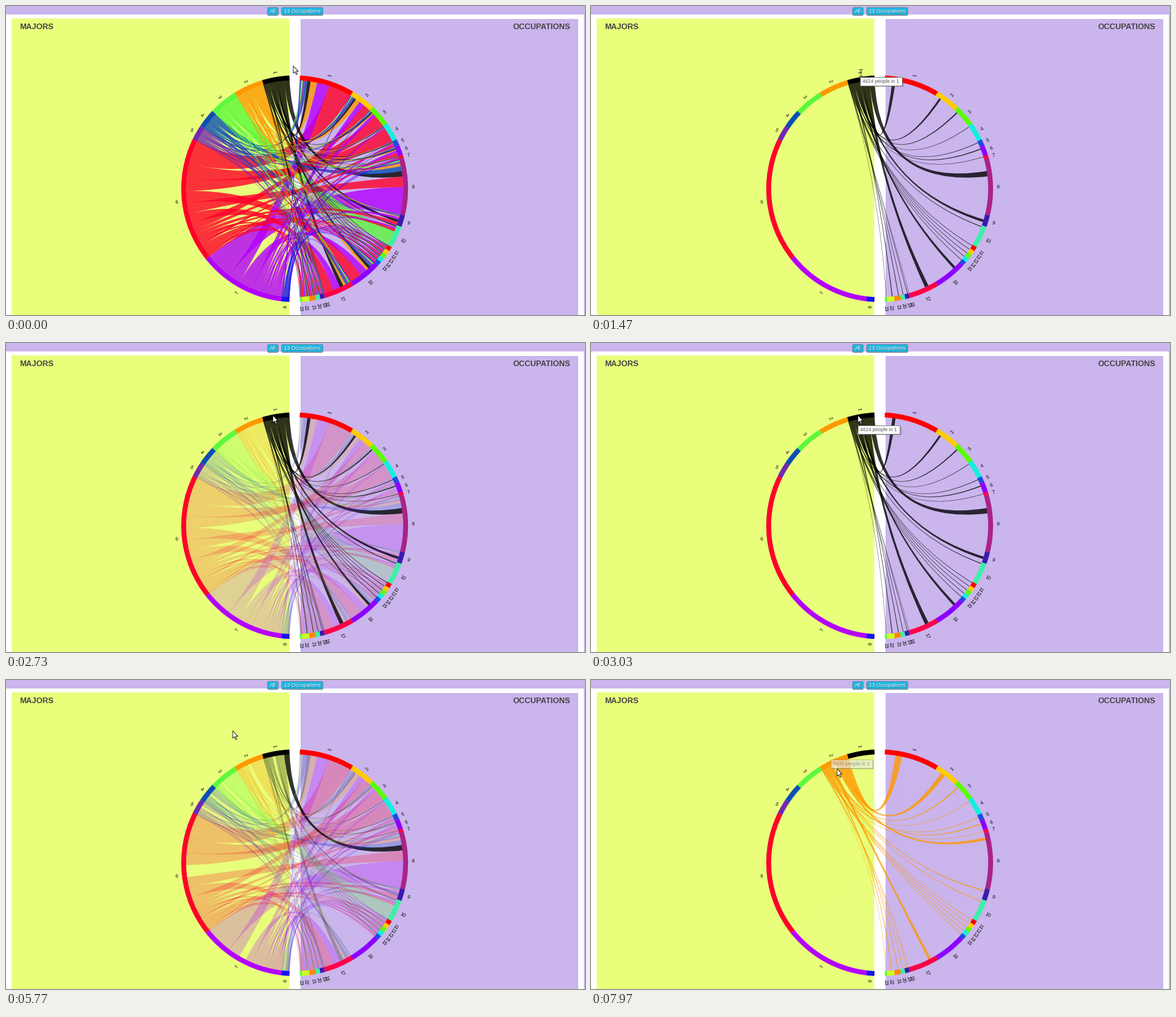
Recreate the animation shown at these times as a matplotlib script. Size 1024 px wide and 547 px high, loop 8000 ms.

```python
import numpy as np
import matplotlib.pyplot as plt
from matplotlib.animation import FuncAnimation
from matplotlib.collections import PathCollection
from matplotlib.colors import to_rgb
from matplotlib.patches import FancyBboxPatch, Polygon, Rectangle, Wedge
from matplotlib.path import Path

W, H, DPI = 1024, 547, 64
LOOP, STEP = 8000, 40
PT = 72 / DPI                      # points per pixel
CX, CY, R_OUT, R_IN = 510.5, 323.5, 200.5, 192
GAP = 2.7                          # half opening at top and bottom, degrees
LILAC, LEMON = "#cab5ec", "#e9ff7c"
plt.rcParams["font.family"] = "Liberation Sans"

# Share of each group in degrees, running down from the top
MAJORS = np.array([14, 15.3, 14.6, 9.6, 7.8, 64.4, 44.8, 4.1])
JOBS = np.array([28.3, 12.8, 10.9, 9.4, 3.1, 5.3, 1.7, 29.5, 6, 11.4,
                 *[2.34] * 5, 16.1, 15.3, .4, 2.3, 2.3, 3.2, 3.9, 1])
MAJOR_COL = ["#000000", "#ff9900", "#5cf83c", "#0b4fb5", "#7228b0",
             "#ff0029", "#b300ff", "#1a10f0"]
JOB_COL = ["#ff0000", "#ffcc00", "#59ff00", "#0ff0e0", "#1f4ce0", "#8c00ff",
           "#ff0048", "#aa2288", "#3a1ab0", "#3cf0a8"] * 2
JOB_COL += ["#ff8800", "#ccff22", "#59ff44"]

# Pairs (major, job) that are far more common than chance
AFFINITY = {(3, 10): 40, (6, 4): 9, (7, 8): 3.7, (1, 9): 3, (4, 8): 2.8,
            (6, 3): 2.8, (2, 2): 2.2, (1, 8): 2.1, (2, 1): 1.9, (6, 1): 1.8,
            (1, 17): 1.6, (7, 1): 1.3, (6, 16): 1.2}


def flow_matrix():
    """Spread evenly, favour the linked pairs, then fit both totals."""
    m = np.outer(MAJORS, JOBS)
    for (major, job), k in AFFINITY.items():
        m[major - 1, job - 1] *= k
    for _ in range(80):
        m *= (MAJORS / m.sum(axis=1))[:, None]
        m *= JOBS / m.sum(axis=0)
    return m


def bounds(spans, side):
    """Clockwise angles from the top; side is -1 for the left half."""
    return side * (GAP + np.concatenate([[0], np.cumsum(spans)]))


def polar(deg, r=R_IN):
    a = np.radians(deg)
    return np.column_stack([CX + r * np.sin(a), CY - r * np.cos(a)])


def sub_arcs(sizes, start):
    """Stack the sizes clockwise from start, smallest first."""
    order = np.argsort(sizes)
    ends = start + np.cumsum(sizes[order])
    out = np.empty((len(sizes), 2))
    out[order] = np.column_stack([ends - sizes[order], ends])
    return out


def chord_path(src, dst):
    n = 12
    a, b = polar(np.linspace(*src, n)), polar(np.linspace(*dst, n))
    hub = [[CX, CY]]
    arc = [Path.LINETO] * (n - 1)
    curve = [Path.CURVE3] * 2
    return Path(np.vstack([a, hub, b, hub, a[:1]]),
                [Path.MOVETO] + arc + curve + arc + curve)


def ease(x):
    x = min(max(x, 0), 1)
    return 4 * x ** 3 if x < .5 else 1 - 4 * (1 - x) ** 3


def fade(t, start, end, step, lag=0):
    """Stepped 750 ms cubic transition that is complete at end."""
    if t < start:
        return 0
    if t >= end:
        return 1
    return ease(((t - start) // step * step - lag) / 750)


fig = plt.figure(figsize=(W / DPI, H / DPI), dpi=DPI, facecolor="white")
ax = fig.add_axes([0, 0, 1, 1])
ax.set_xlim(0, W)
ax.set_ylim(H, 0)
ax.axis("off")


def rect(x0, y0, x1, y1, **kw):
    kw = {"lw": 0, **kw}
    return ax.add_patch(Rectangle((x0, y0), x1 - x0, y1 - y0, **kw))


def text(x, y, s, px, **kw):
    return ax.text(x, y, s, fontsize=px * PT, **kw)


def button(x0, x1, label):
    for dy, fc, ec in ((.8, "#8d8a99", "#8d8a99"), (0, "#1fb6e2", "#6f8792")):
        ax.add_patch(FancyBboxPatch(
            (x0 + 2, 4 + dy), x1 - x0 - 4, 10.5, lw=PT, fc=fc, ec=ec,
            boxstyle="round,pad=1.5,rounding_size=2.5", zorder=2))
    for d, c in ((.7, "#0c6c94"), (0, "white")):
        text((x0 + x1) / 2 + d, 12 + d, label, 9.3, color=c, ha="center",
             zorder=3)


def ring(edges, colors):
    for k, color in enumerate(colors):
        lo, hi = sorted(edges[k:k + 2])
        ax.add_patch(Wedge((CX, CY), R_OUT, lo - 90, hi - 90,
                           width=R_OUT - R_IN, fc=color, ec=color,
                           lw=.2, zorder=3))
        mid = (lo + hi) / 2
        left = mid < 0
        text(*polar(mid, 207.4)[0], str(k + 1), 8.8, color="#111111",
             rotation=(-90 if left else 90) - mid, rotation_mode="anchor",
             ha="right" if left else "left", va="center_baseline", zorder=4)


rect(0, 0, W, 14.6, color=LILAC)
rect(1021.5, 0, W, H, color=LILAC)
rect(10, 21.5, 500.5, H, color=LEMON)
rect(521, 22.5, 1011.5, H, color=LILAC)
text(24, 41, "MAJORS", 14, weight="bold", color="#444444")
text(998, 41, "OCCUPATIONS", 14, weight="bold", color="#444444", ha="right")
button(462, 482, "All")
button(487, 561, "13 Occupations")

major_edges, job_edges = bounds(MAJORS, -1), bounds(JOBS, 1)
ring(major_edges, MAJOR_COL)
ring(job_edges, JOB_COL)

flow = flow_matrix()
src = [sub_arcs(row, edge) for row, edge in zip(flow, major_edges[1:])]
dst = [sub_arcs(col, edge) for col, edge in zip(flow.T, job_edges)]
order = np.argsort(-flow.ravel())          # wide chords lie underneath
pairs = [divmod(k, len(JOBS)) for k in order]
rgba = np.array([(*to_rgb(MAJOR_COL[i]), 1) for i, _ in pairs])
chords = PathCollection([chord_path(src[i][j], dst[j][i]) for i, j in pairs],
                        linewidths=.2, zorder=2)
ax.add_collection(chords, autolim=False)


class Tooltip:
    def __init__(self, x, y, label, times):
        self.times = times
        words = text(x + 5, y + 10.6, label, 8.8, color="#575757", zorder=7)
        w = words.get_window_extent().width + 10
        shadow = rect(x + 3, y + 3, x + w + 2.5, y + 17.5, color="#555555",
                      zorder=5)
        box = rect(x + .5, y + .5, x + w, y + 15.5, fc="white", ec="#767676",
                   lw=PT, zorder=6)
        self.parts = [(shadow, .35), (box, 1), (words, 1)]

    def update(self, t):
        a = np.interp(t, self.times, [0, 1, 1, 0])
        for part, strength in self.parts:
            part.set_alpha(a * strength)
            part.set_visible(a > 0)


tips = [
    Tooltip(475, 125, "4624 people in 1", [1250, 1470, 2110, 2300]),
    Tooltip(471, 145, "4624 people in 1", [3029, 3030, 4509, 4510]),
    Tooltip(496, 149, "1056 people from 1 to 8", [4509, 4510, 5440, 5640]),
    Tooltip(423, 140, "5038 people in 2", [7320, 7530, 7770, 8250]),
]

ARROW = np.array([(0, 0), (0, 13), (3, 10.4), (5.2, 15.4), (7.2, 14.6),
                  (5, 9.7), (9, 9.7)])
BREAK = (np.nan, np.nan)
IBEAM = np.array([(-3, -6), (3, -6), BREAK, (0, -6), (0, 6), BREAK,
                  (-3, 6), (3, 6)])
# Pointer legs: start, end, where it stops
LEGS = [(160, 460, 477, 118), (2110, 2300, 472, 128), (3700, 4000, 496, 133),
        (5440, 5770, 401, 90), (5850, 6680, 424, 133), (7770, 7970, 435, 157)]
arrow = ax.add_patch(Polygon(ARROW, fc="white", ec="black", lw=PT * .9,
                             zorder=9))
ibeam, = ax.plot([], [], color="#333333", lw=PT, zorder=9)


def pointer(t):
    pos = np.array([508.0, 106.0])
    for start, end, x, y in LEGS:
        pos += (np.array([x, y]) - pos) * np.clip((t - start) / (end - start),
                                                  0, 1)
    return pos


def levels(t):
    """Visibility of every chord, 0 to 1."""
    a = np.ones(flow.shape)
    if t < 3730:                   # major 1 in focus
        if t < 2120:
            a[1:] = 1 - fade(t, 620, 1100, 80, 64)
        elif t < 2450:
            a[1:] = fade(t, 2120, 2890, 75, -20)
        else:
            a[1:] = .31 * (1 - fade(t, 2450, 2890, 75))
    elif t < 6840:                 # chord from 1 to 8 in focus
        back = fade(t, 5450, 6210, 76, -16)
        a[:] = back
        a[0] = max(back, 1 - fade(t, 3730, 4360, 79, -70))
        a[0, 7] = 1
    else:                          # major 2 in focus
        a[:] = 1 - fade(t, 6840, 7090, 83, -100)
        if t >= 7780:
            a[:] = fade(t, 7780, 8540, 95, 110)
        a[1] = 1
    if t >= 4360:
        a[:, 15] = 0               # occupation 16 does not come back
    return a


def draw(k):
    t = k * STEP + STEP - 10
    rgba[:, 3] = .8 * levels(t).ravel()[order]
    chords.set_facecolor(rgba)
    chords.set_edgecolor(rgba)
    for tip in tips:
        tip.update(t)
    pos = pointer(t)
    over_text = 440 <= t < 2130 or 6660 <= t < 7790
    arrow.set_xy(ARROW + pos)
    ibeam.set_data(*(IBEAM + pos).T)
    arrow.set_visible(not over_text)
    ibeam.set_visible(over_text)


anim = FuncAnimation(fig, draw, frames=LOOP // STEP, interval=STEP,
                     repeat=True, repeat_delay=0)
plt.show()
```
